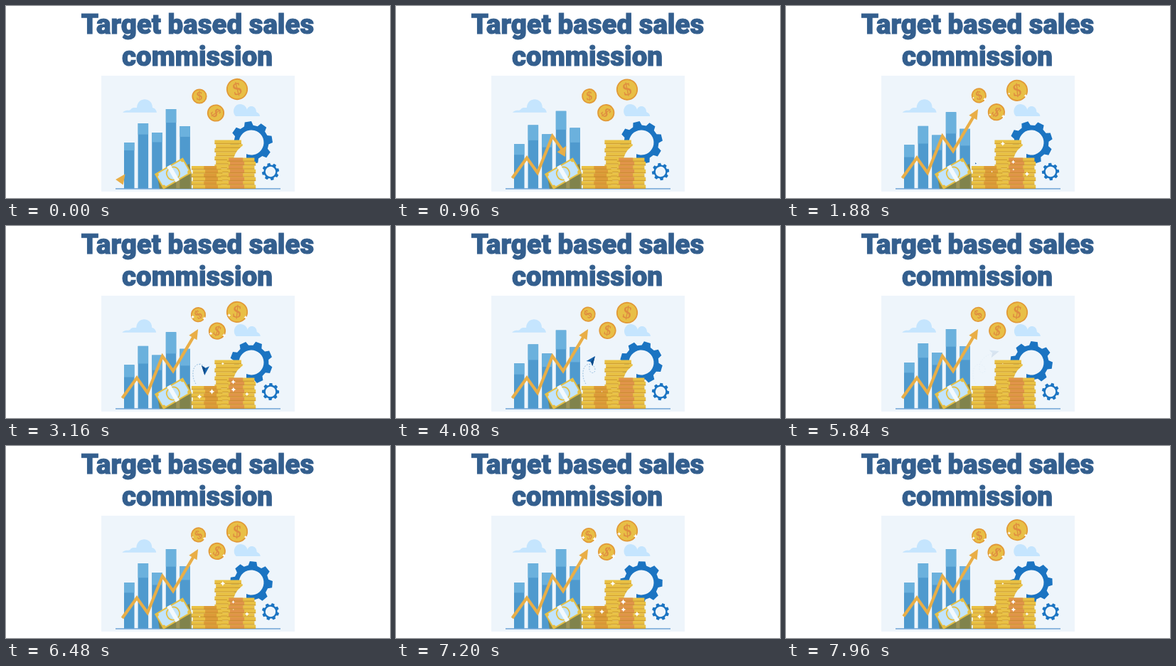
These frames come from a looping animation (540x270 px, 8000 ms). An HTML page:

```html
<!DOCTYPE html>
<html lang="en">
<head>
<meta charset="utf-8">
<title>Target based sales commission</title>
<style>
html, body { margin: 0; width: 100%; height: 100%; overflow: hidden; background: #fff; }
svg { display: block; width: 540px; height: 270px; }
.title { font: 900 38.5px Roboto, sans-serif; fill: #345f8e; stroke: #345f8e; stroke-width: 1.1; text-anchor: middle; }
.dollar { font-family: "Liberation Serif", serif; fill: #df8c40; stroke: #df8c40; stroke-width: .4; text-anchor: middle; }
.gear { fill: #1b74c2; fill-rule: evenodd; }
.cloud { fill: #c5e5fe; }
</style>
</head>
<body>
<svg viewBox="0 0 540 270">
  <defs>
    <path id="route" d="M267 222C262 214 261 202 267 196C272 192 280 196 280 202C280 208 273 208 272 202C271 193 276 183 293 178"/>
    <mask id="flown" maskUnits="userSpaceOnUse" x="250" y="165" width="60" height="65">
      <use href="#route" id="reveal" stroke="#fff" stroke-width="3" fill="none"/>
    </mask>
    <path id="star" fill="#fff" d="M0 -1Q.14 -.14 1 0Q.14 .14 0 1Q-.14 .14 -1 0Q-.14 -.14 0 -1Z"/>
  </defs>
  <text class="title" x="269.5" y="39">Target based sales</text>
  <text class="title" x="269" y="84">commission</text>
  <path fill="#eef5fb" d="M134 98h272v163h-272z"/>
  <path id="cloudL" class="cloud" d="M164 149.8C169 145 172 148 175 146C177 142 182 143 184 143C185 127 206 128 206 143Q211 144 212 149.8Z"/>
  <path id="cloudR" class="cloud" d="M323 155C317 149 321 138 329 138C335 138 338 142 339 146C340 139 352 139 352 149Q357 151 357 155Z"/>
  <g id="bars"></g>
  <g id="gears"></g>
  <path stroke="#6fa5d6" stroke-width="1.6" d="M154 257h232"/>
  <path id="shaft" fill="none" stroke="#e9ae47" stroke-width="4.2" d="M163.5 242L184 213.5L199 234.5L220 183L235 204L266.5 151"/>
  <path id="tip" fill="#e9ae47" d="M7 0L-7 -6.5V6.5Z"/>
  <path fill="#8d7d2c" opacity=".8" d="M213 241L258 222L261 237V257H216Z"/>
  <g transform="translate(235 235.5) rotate(-30)">
    <path fill="#e6bf43" d="M-23 -12.5h46v25h-46z"/>
    <path fill="#c3e4fb" d="M-18 -10.5H18Q18 -7 21 -7V7Q18 7 18 10.5H-18Q-18 7 -21 7V-7Q-18 -7 -18 -10.5Z"/>
    <path fill="#f4fafe" d="M-3 -12.5H3V12.5H-3Z"/>
    <path fill="none" stroke="#e6bf43" stroke-width="1.8" d="M-3 -8.5A9 9 0 0 0 -3 8.5M3 -8.5A9 9 0 0 1 3 8.5"/>
  </g>
  <g id="stacks"></g>
  <g id="plane">
    <use href="#route" mask="url(#flown)" fill="none" stroke="#8fb9dc" stroke-width="1" stroke-dasharray="1.8 1.8"/>
    <g id="glider">
      <path fill="#1764ad" d="M7 0L-6 -5.5L-3 0L-6 5.5Z"/>
      <path fill="#0e4a88" d="M7 0L-3 0L-6 5.5Z"/>
    </g>
  </g>
  <g id="coins"></g>
  <g id="sparkles"></g>
</svg>
<script>
const LOOP = 8000, CYCLE = 9400, GROUND = 257;
const $ = id => document.getElementById(id);

function add(parent, tag, attrs = {}) {
  const node = document.createElementNS('http://www.w3.org/2000/svg', tag);
  for (const key in attrs) set(node, key, attrs[key]);
  return parent.appendChild(node);
}
function set(node, key, value) { node.setAttribute(key, value); }
const ramp = (t, a, b) => Math.min(1, Math.max(0, (t - a) / (b - a)));
const ease = p => p * p * (3 - 2 * p);
const mix = (a, b, p) => a + (b - a) * p;

let seed = 11;
const random = () => (seed = seed * 16807 % 2147483647) / 2147483647;

const bars = [65, 92, 79, 112, 88].map((height, i) => {
  const bar = fill => add($('bars'), 'rect', { x: 166 + 19.6 * i, width: 14.5, fill });
  return { height, dark: bar('#4f9ace'), light: bar('#6bb1dd') };
});

function gear(x, y, outer, root, hole) {
  const points = Array.from({ length: 32 }, (_, k) => {
    const angle = ((k >> 2) * 45 + [-15, -9, 9, 15][k % 4]) * Math.PI / 180;
    const r = k % 4 === 1 || k % 4 === 2 ? outer : root;
    return `${r * Math.sin(angle)} ${-r * Math.cos(angle)}`;
  });
  const ring = `M${-hole} 0a${hole} ${hole} 0 1 0 ${2 * hole} 0a${hole} ${hole} 0 1 0 ${-2 * hole} 0Z`;
  const node = add($('gears'), 'path', { class: 'gear', d: `M${points.join('L')}Z${ring}` });
  return degrees => set(node, 'transform', `translate(${x} ${y}) rotate(${degrees})`);
}
const turnBig = gear(345, 192, 30, 24.5, 17.5);
const turnSmall = gear(372, 233, 12.2, 9.6, 7.2);

// The shaded band covers the given part of each coin's width
function stack(x, top, width, rows, from = 0, to = 0, shade = 'none') {
  const height = (GROUND - top) / rows;
  for (let i = 0; i < rows; i++) {
    const left = x + (i % 2 ? 1.2 : -0.6), y = top + i * height;
    const slab = (x, y, width, height, fill) => add($('stacks'), 'rect', { x, y, width, height, fill });
    slab(left, y, width, height, '#e9c144');
    slab(left + width * from, y, width * (to - from), height, shade);
    set(slab(left, y + height - 1.4, width, 1.4, '#bd8526'), 'opacity', 0.55);
  }
  return { x, top, width };
}
const tall = stack(294, 188.5, 37.5, 12);
add($('stacks'), 'path', { fill: '#eef5fb', d: 'M335 195Q324 201 320 214H338V195Z' });
const low = stack(261.5, 225, 41.5, 6, 0.42, 0.85, '#dc9a38');
const front = stack(311.5, 213.5, 38.5, 8, 0.06, 0.58, '#e0944a');

const twinkle = (t, shift = 0) =>
  Math.max(0, Math.cos(4 * Math.PI * (t - 2520 - shift) / CYCLE)) ** 0.6;

function star(parent, x, y, size, shift) {
  const node = add(parent, 'use', { href: '#star' });
  return t => set(node, 'transform', `translate(${x} ${y}) scale(${size * twinkle(t, shift)})`);
}

const stars = [tall, low, front].flatMap(({ x, top, width }) => [0.3, 0.7].map(part => {
  const y = mix(top + 5, Math.min(top + 35, GROUND - 6), random());
  return star($('sparkles'), x + width * (part + 0.2 * random() - 0.1), y, 3.6 + random(), 900 * random() - 300);
}));

// Each coin sways between two poses of x, y and tilt
const coins = [
  { r: 10.5, from: [272, 127, 0], to: [270, 124, -50] },
  { r: 12, from: [295, 150.5, 55], to: [297.6, 146.8, 8] },
  { r: 15, from: [325, 117, -15], to: [325, 122.2, 12] }
];
for (const coin of coins) {
  const { r } = coin;
  coin.node = add($('coins'), 'g');
  coin.face = add(coin.node, 'g');
  add(coin.face, 'circle', { r: r - 0.8, fill: '#e8bf46', stroke: '#e29a38', 'stroke-width': 1.8 });
  add(coin.face, 'text', { class: 'dollar', y: r * 0.5, 'font-size': r * 1.6 }).textContent = '$';
  stars.push(star(coin.node, r * 0.8, r * 0.5, 3.4, 0), star(coin.node, -r * 0.75, r * 0.3, 2.8, 200));
}

const shaft = $('shaft'), route = $('route');
const shaftLength = shaft.getTotalLength(), routeLength = route.getTotalLength();

function along(path, at, length) {
  const a = path.getPointAtLength(Math.max(0, at - 0.5));
  const b = path.getPointAtLength(Math.min(length, at + 0.5));
  const p = path.getPointAtLength(at);
  return `translate(${p.x} ${p.y}) rotate(${Math.atan2(b.y - a.y, b.x - a.x) * 180 / Math.PI})`;
}

function drawBars(t) {
  const dip = ease(ramp(t, 0, 1600)) - ease(ramp(t, 3200, 4700));
  const share = 0.17 + 0.05 * ramp(t, 0, 1600) + 0.06 * dip;
  for (const { height, dark, light } of bars) {
    const full = height - dip * (2 + height / 50);
    for (const bar of [dark, light]) set(bar, 'y', GROUND - full);
    set(dark, 'height', full);
    set(light, 'height', full * share);
  }
}

function drawArrow(t) {
  const head = shaftLength * ease(ramp(t, 0, 1500));
  const tail = 3 * ramp(t, 7700, 7960) ** 2;
  set(shaft, 'stroke-dasharray', `${Math.max(0, head - tail)} 999`);
  set(shaft, 'stroke-dashoffset', -tail);
  set(shaft, 'visibility', head > 0.5 ? 'visible' : 'hidden');
  set($('tip'), 'transform', along(shaft, head, shaftLength));
}

function drawPlane(t) {
  const at = routeLength * (1 - (1 - ramp(t, 1860, 5160)) ** 1.35);
  set($('plane'), 'opacity', t < 1840 ? 0 : 1 - ramp(t, 5300, 5900));
  set($('reveal'), 'stroke-dasharray', `${at} 999`);
  const size = mix(0.15, 1, ramp(t, 1860, 2700));
  set($('glider'), 'transform', `${along(route, at, routeLength)} scale(${size})`);
}

function draw(t) {
  const sway = (1 - Math.cos(2 * Math.PI * t / CYCLE)) / 2;
  set($('cloudL'), 'transform', `translate(${-sway})`);
  set($('cloudR'), 'transform', `translate(${sway})`);
  // One tooth per cycle, the two gears in opposite directions
  const turn = 45 * t / CYCLE;
  turnBig(36 - turn);
  turnSmall(turn - 13);
  drawBars(t);
  drawArrow(t);
  drawPlane(t);
  for (const { node, face, from, to } of coins) {
    const [x, y, tilt] = from.map((start, i) => mix(start, to[i], sway));
    set(node, 'transform', `translate(${x} ${y})`);
    set(face, 'transform', `rotate(${tilt})`);
  }
  for (const shine of stars) shine(t);
}

function tick() {
  draw(performance.now() % LOOP);
  requestAnimationFrame(tick);
}
tick();
</script>
</body>
</html>
```
